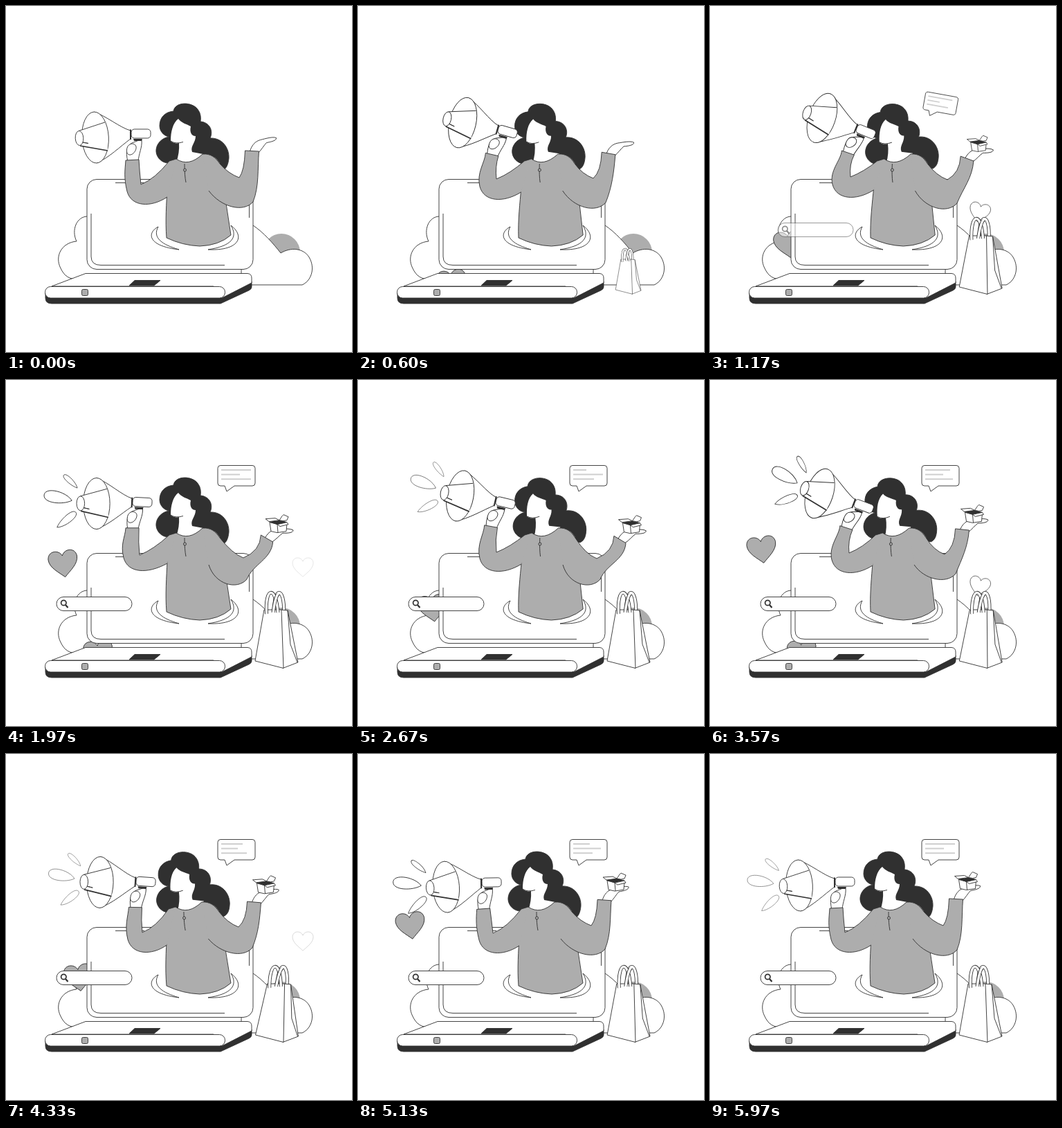
An HTML page with a canvas that plays this animation: 500x500 px, repeating every 6000 ms.

```html
<!DOCTYPE html>
<html lang="en">
<head>
<meta charset="utf-8">
<title>Online shopping announcement</title>
<style>
html, body { margin: 0; width: 100%; height: 100%; overflow: hidden; background: #fff; }
canvas { display: block; width: 500px; height: 500px; }
</style>
</head>
<body>
<canvas id="stage"></canvas>
<script>
const LOOP = 6000;
const INK = '#303030', GREY = '#adadad', PALE = '#cfcfcf', WHITE = '#fff';
const canvas = document.getElementById('stage');
const ctx = canvas.getContext('2d');
const dpr = window.devicePixelRatio || 1;
canvas.width = canvas.height = 500 * dpr;

// Pose values at these times, joined by a smooth curve.
const TIMES = [0, 600, 1170, 1970, 2670, 3570, 4330, 5150, 5970];
const POSE = {
  hornX: [195, 216, 225, 197, 213, 222, 202, 193, 195],
  hornY: [185, 182, 182, 177, 178, 183, 185, 186, 185],
  hornA: [0, 16, 22, 3, 13.5, 21, 4, -1, 0],
  elbowX: [175, 176, 177, 170, 176, 176, 176, 175, 175],
  elbowY: [268, 261, 258, 257, 258, 260, 268, 269, 268],
  bendX: [195, 200, 203, 193, 200, 201, 197, 195, 195],
  bendY: [258, 250, 247, 253, 249, 250, 258, 259, 258],
  lean: [0, 4, 5, 0, 4.5, 3, -1, 0, 0],
  headX: [0, 6, 8, 0, 7.5, 5.5, 1, 0, 0],
  headA: [0, -2, -3.5, 0, -4, -5, -4, 0, 0]
};
const REACH = {
  cuffX: [355.5, 362, 371.5, 377, 378.5, 364.5, 358.5, 356, 355.5],
  cuffY: [209.5, 213, 220.5, 229, 230.5, 216, 214, 211, 209.5],
  cuffA: [3, 10, 20, 30, 31, 6, 5, 4, 3],
  handA: [0, 5, 10, 11, 10, 8, 2, 0, 0],
  bendX: [337, 340, 343, 343, 345, 339, 336, 337, 337],
  bendY: [248, 249, 251, 257, 258, 252, 250, 248, 248],
  elbowX: [357, 358, 357, 348, 350, 355, 356, 357, 357],
  elbowY: [283, 284, 285, 288, 288, 280, 280, 282, 283]
};
const EXTRA = {
  bag: [0, 0, 2, 0, 0, 3, 6, 1, 0],
  ray: [0, 0, 0, 1, .5, 1, .4, 1, .4],
  line1: [0, 20, 40, 43, 19, 36, 31, 24, 43],
  line2: [0, 10, 20, 27, 43, 26, 24, 40, 27],
  line3: [0, 18, 35, 43, 30, 40, 37, 28, 43]
};

function spline(v, t) {
  const n = TIMES.length;
  if (t >= TIMES[n - 1]) return v[n - 1];
  let i = 0;
  while (t >= TIMES[i + 1]) i++;
  const slope = k => k === 0 || k === n - 1 ? 0 : (v[k + 1] - v[k - 1]) / (TIMES[k + 1] - TIMES[k - 1]);
  const d = TIMES[i + 1] - TIMES[i], s = (t - TIMES[i]) / d, s2 = s * s, s3 = s2 * s;
  return v[i] * (2 * s3 - 3 * s2 + 1) + slope(i) * d * (s3 - 2 * s2 + s) +
    v[i + 1] * (3 * s2 - 2 * s3) + slope(i + 1) * d * (s3 - s2);
}
const poseAt = (table, t) =>
  Object.fromEntries(Object.entries(table).map(([k, v]) => [k, spline(v, t)]));
const span = (t, a, b) => Math.min(1, Math.max(0, (t - a) / (b - a)));
const smooth = s => s * s * (3 - 2 * s);
const rad = a => a * Math.PI / 180;

function turn(x, y, a, ox, oy) {
  const c = Math.cos(rad(a)), s = Math.sin(rad(a));
  return [ox + x * c - y * s, oy + x * s + y * c];
}
function draw(path, fill, stroke = INK, width = .9) {
  const p = typeof path === 'string' ? new Path2D(path) : path;
  if (fill) { ctx.fillStyle = fill; ctx.fill(p); }
  if (stroke) { ctx.strokeStyle = stroke; ctx.lineWidth = width; ctx.stroke(p); }
}
function oval(x, y, rx, ry, a, fill, stroke, width) {
  const p = new Path2D();
  p.ellipse(x, y, rx, ry, rad(a), 0, 7);
  draw(p, fill, stroke, width);
}
function box(x, y, w, h, r, fill, stroke, width) {
  const p = new Path2D();
  p.roundRect(x, y, w, h, r);
  draw(p, fill, stroke, width);
}
function at(x, y, a, scale, body, alpha = 1) {
  if (scale <= 0 || alpha <= 0) return;
  ctx.save();
  ctx.globalAlpha = Math.min(1, alpha);
  ctx.translate(x, y);
  ctx.rotate(rad(a));
  ctx.scale(scale, scale);
  body();
  ctx.restore();
}

function heart(x, y, size, a, fill, alpha) {
  at(x, y, a, size / 42, () =>
    draw('M0,-11 C4,-21 20,-21 21,-8 C21,4 8,12 0,20 C-8,12 -21,4 -21,-8 C-20,-21 -4,-21 0,-11Z', fill), alpha);
}

function backdrop() {
  draw('M118,304 C102,304 94,324 102,340 C80,342 70,362 79,379 C84,390 92,395 100,394', null);
  oval(398, 356, 27, 27, 0, GREY, null);
  draw('M357,317 C372,327 386,343 397,357 C412,348 430,350 438,363 C448,380 440,398 428,403 H340 V317Z', WHITE);
}

function greyHearts(t) {
  for (const start of [640, 1960, 3550]) {
    const y = 396 - (t - start) * (start === 640 ? .0985 : .094);
    if (t < start - 150 || y < 228) continue;
    heart(79 + (y - 255) * .39, y, 42, -8, GREY, span(y, 228, 242));
  }
}

function screen() {
  box(117, 250.5, 240, 130, 14, WHITE);
  draw('M123,300 V362 Q123,374.5 137,374.5 H316 M158,255.5 H200 M351.5,275 V306', null);
}

function base() {
  draw('M57,414 V422 Q57,430 66,430 H310 L351,411 Q355,409 355,406 V398 L312,420Z', INK);
  draw('M66,405 L115,386.5 H349 Q355,387 355,393 V400 L312,422 L300,405Z', WHITE);
  box(56.5, 405.5, 260, 16.5, 8, WHITE);
  draw('M186,396.5 H223 L214,404 H178Z', INK);
  box(109.5, 409.5, 9, 9, 2, GREY);
}

function ripples() {
  draw('M220,319 C203,328 205,347 250,352 C226,345 211,335 220,319Z', WHITE);
  draw('M325,317 C346,333 337,354 292,352 C325,347 336,335 325,317Z', WHITE);
}

function head(p) {
  at(265 + p.headX, 215, p.headA, 1, () => {
    ctx.translate(-265, -215);
    draw('M242,152 C244,139 265,138 275,147 C281,153 282,160 281,167 C294,168 300,180 295,191 ' +
      'C312,190 323,205 322,220 C321,230 318,236 312,238 L252,222 C236,232 222,226 218,215 ' +
      'C214,204 222,191 236,189 C228,188 222,181 222,173 C222,161 230,153 242,152Z', INK);
    draw('M249,163 C253,169 262,171 267,174 C265,182 268,188 274,188 C274,198 266,202 269,211 ' +
      'L285,214 L275,232 L246,226 Q251,212 250,198 C246,199 241,198 238,195 C238,182 241,169 249,163Z', WHITE, null);
    draw('M238,195 Q245,200 256,196.5', null);
  });
}

function torso(p) {
  ctx.save();
  ctx.transform(1, 0, -p.lean / 100, 1, p.lean * 3.35, 0);
  draw('M246,221 Q264,233 284,214 L291,214 Q303,217 309,227 L318,287 L325,331 ' +
    'Q308,346 280,347 Q255,346 232,335 C230,310 232,285 233,262 L234,226Z', GREY, null);
  draw('M318,285 L325,331 Q308,346 280,347 Q255,346 232,335 C230,310 232,285 233,262', null);
  ctx.restore();
}

function leftArm(p, sk) {
  const [lx, ly] = turn(-22, 38, p.hornA, p.hornX, p.hornY);
  const [rx, ry] = turn(-3, 37, p.hornA, p.hornX, p.hornY);
  const { elbowX: ex, elbowY: ey, bendX: bx, bendY: by } = p;
  draw(`M${sk(246, 221)} L${sk(236, 224)} Q${bx + 20},${by - 8} ${bx},${by} ` +
    `Q${bx - 2},${by - 18} ${rx},${ry} L${lx},${ly} ` +
    `C${lx - 1},${ly + 14} ${ex - 5},${ey - 20} ${ex},${ey} ` +
    `C${ex + 6},${ey + 22} ${ex + 34},${ey + 24} ${sk(233, ey + 8)}`, GREY);
}

function rightArm(r, sk) {
  const [lx, ly] = turn(-10, 0, r.cuffA, r.cuffX, r.cuffY);
  const [rx, ry] = turn(10, 0, r.cuffA, r.cuffX, r.cuffY);
  const { elbowX: ex, elbowY: ey, bendX: bx, bendY: by } = r;
  at(r.cuffX, r.cuffY, r.handA, 1, () =>
    draw('M-4,4 C-1,-9 5,-14 12,-16 C20,-18 30,-21 35,-19 C36,-15 27,-13 21,-12 C17,-8 14,-2 8,4', WHITE));
  draw(`M${sk(284, 214)} C${sk(296, 213)} ${sk(303, 219)} ${sk(309, 228)} ` +
    `Q${bx - 16},${by - 6} ${bx},${by} Q${lx - 1},${by - 10} ${lx},${ly} L${rx},${ry} ` +
    `C${rx - 2},${ry + 25} ${ex + 9},${ey - 22} ${ex},${ey} ` +
    `C${ex - 14},${ey + 16} ${ex - 46},${ey + 8} ${sk(293, 267)}`, GREY);
}

function collar(p) {
  ctx.save();
  ctx.transform(1, 0, -p.lean / 100, 1, p.lean * 3.35, 0);
  draw('M246,221 Q264,233 284,214 M258,228 Q258,245 260,255', null);
  oval(258.5, 237, 2, 2, 0, GREY);
  ctx.restore();
}

function leftHand(p) {
  at(p.hornX, p.hornY, p.hornA, 1, () => {
    draw('M-19,40 C-23,24 -19,16 -13,13 L-3,9 L1,9 C2,20 -3,27 -4,40', WHITE);
    draw('M-20,20 C-18,13 -9,12 -7,18 C-6,24 -12,31 -17,30 C-21,29 -21,24 -20,20Z', WHITE);
  });
}

function horn(p) {
  at(p.hornX, p.hornY, p.hornA, 1, () => {
    draw('M-11,7 H2 L1,10 H-10Z', INK, null);
    draw('M-68,-32 C-50,-26 -30,-9 -15,-5 L-15,7 C-30,18 -46,34 -64,42Z', WHITE);
    oval(-66, 5, 19.3, 37, -3, WHITE);
    draw('M-90,-4.5 L-52,-17 L-48,24 L-88,17Z', WHITE, null);
    draw('M-90,-4.5 L-52,-17 M-85,12 L-76,13.5', null);
    draw('M-88,17 L-48,24', null, INK, 1.7);
    oval(-89, 6, 5.8, 10.5, -3, WHITE);
    draw('M-84,12 L-76,13.5', null);
    box(-14, -7, 28, 13, 4.5, WHITE);
    draw('M-15,-6.5 V8', null, INK, 2);
  });
}

function rays(p, glow, t) {
  const alpha = span(t, 1350, 1700) * (.3 + .7 * glow), size = .91 + .11 * glow;
  const petal = (x, y, a, s, flat) => at(x, y, a, s * size, () => {
    ctx.scale(1, flat);
    draw('M20,2 C10,-10 -20,-13 -20,-1 C-20,11 8,10 20,2Z', WHITE, INK, .9 / s);
  }, alpha);
  at(p.hornX, p.hornY, p.hornA, 1, () => {
    petal(-122, -1, 4, 1, 1);
    petal(-105, -25, 38, .66, .65);
    petal(-108, 31, 135, .85, .75);
  });
}

function parcel(r, t) {
  const s = smooth(span(t, 650, 1300));
  at(r.cuffX + 16, r.cuffY - 25 + r.handA * .42, 0, s, () => {
    draw('M-12,-3 L-10,10 L-1,12 L12,10 L13,-2 L0,0Z', WHITE);
    draw('M-13,-4 L2,-6 L13,-3 L-1,0Z', INK);
    draw('M-1,0 L0,12', null);
    draw('M-13,-4 L-18,-8 L-4,-9 L2,-6Z', WHITE);
    draw('M2,-6 L6,-12 L8,-14 L15,-11 L13,-6 L8,-5Z', WHITE);
    draw('M-1,0 L3,3 L15,0 L13,-3Z', WHITE);
  });
}

function whiteHearts(t) {
  for (const start of [770, 3170]) {
    const k = t - start;
    if (k < 0 || k > 1260) continue;
    const out = smooth(span(k, 350, 1150));
    heart(389 + 40 * out, 325 - 27 * smooth(span(k, 0, 420)) - 28 * out,
      12 + 18 * span(k, 0, 380), 14 - 14 * out, WHITE, 1 - .95 * span(k, 850, 1260));
  }
}

function bag(t, sway) {
  const s = smooth(span(t, 150, 950));
  if (!s) return;
  ctx.save();
  ctx.translate(390, 416);
  ctx.scale(s, s);
  ctx.transform(1, 0, -sway / 110, 1, 0, 0);
  ctx.translate(-390, -416);
  const handle = d => { draw(d, null, INK, 5); draw(d, null, WHITE, 3.3); };
  handle('M388,336 C386,298 403,298 401.5,336');
  draw('M397,332 L407,333 L422,408 L400,416.5Z', WHITE);
  draw('M373,332 L398,332 L401,416.5 L360,406Z', WHITE);
  draw('M407,333 L411,382 L421,408', null);
  handle('M376.5,338 C374,298 390,297 393,336');
  draw('M386,336 C388,320 390,312 394,309', null, INK, 5);
  draw('M386,337 C388,320 390,312 394,308', null, WHITE, 3.3);
  ctx.restore();
}

function bubble(t, e) {
  const k = smooth(span(t, 750, 1400));
  at(333, 140 + 8 * (1 - k), 36 * (1 - k), .6 + .4 * k, () => {
    draw('M-23,-16.5 H23 Q27,-16.5 27,-12.5 V9 Q27,13 23,13 H-3 L-14,21 L-17,13 H-23 Q-27,13 -27,9 V-12.5 Q-27,-16.5 -23,-16.5Z', WHITE);
    [e.line1, e.line2, e.line3].forEach((w, i) =>
      draw(`M-22,${-10 + i * 6.6} h${Math.max(0, Math.min(44, w))}`, null, PALE, 2));
  }, span(t, 750, 1050));
}

function searchBar(t) {
  const k = smooth(span(t, 800, 1500));
  at(55 * (1 - k), 0, 0, 1, () => {
    box(73, 313.5, 109, 20, 10, WHITE);
    oval(83.3, 322, 3.7, 3.7, 0, null, INK, 1.7);
    draw('M86,325 L89.5,329', null, INK, 2.2);
  }, k);
}

function render(t) {
  const p = poseAt(POSE, t), r = poseAt(REACH, t), e = poseAt(EXTRA, t);
  const sk = (x, y) => `${x + p.lean * (335 - y) / 100},${y}`;
  ctx.setTransform(dpr, 0, 0, dpr, 0, 0);
  ctx.lineJoin = 'round';
  ctx.fillStyle = WHITE;
  ctx.fillRect(0, 0, 500, 500);
  backdrop();
  greyHearts(t);
  screen();
  base();
  ripples();
  head(p);
  torso(p);
  leftHand(p);
  leftArm(p, sk);
  rightArm(r, sk);
  collar(p);
  horn(p);
  rays(p, e.ray, t);
  parcel(r, t);
  whiteHearts(t);
  bag(t, e.bag);
  bubble(t, e);
  searchBar(t);
}

const begin = performance.now();
function tick() {
  render((performance.now() - begin) % LOOP);
  requestAnimationFrame(tick);
}
tick();
</script>
</body>
</html>
```
